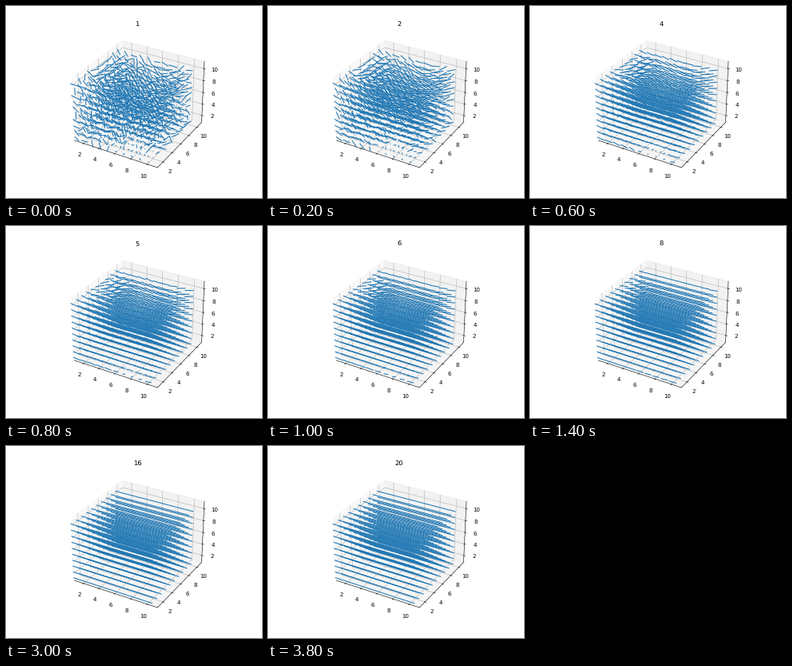
These frames come from a looping animation (320 by 240 pixels, 4 s). A matplotlib script:

```python
import numpy as np
import matplotlib.pyplot as plt
from matplotlib.animation import FuncAnimation

N = 10
FRAMES = 20
INTERVAL = 200
PAD = 10 / 48
LIMITS = (1 - PAD, 11 + PAD)

plt.rcParams["text.hinting"] = "none"

rng = np.random.default_rng(4)
x, y, z = np.meshgrid(*[np.arange(1, N + 1)] * 3, indexing="ij")
a, b, c = [(2 * q - N - 1) / (N - 1) for q in (x, y, z)]


def bump(px, py, pz, r):
    d2 = (a - px) ** 2 + (b - py) ** 2 + (c - pz) ** 2
    return np.exp(-d2 / r**2)


# Tilt of each director away from the x axis (tangents along y and z):
# a smooth part that relaxes slowly and local disorder that fades fast
low = bump(0.55, -1, -1, 0.45)
corner = bump(-0.75, 0.3, 1, 0.4)
top = bump(0, 0.7, 0.6, 0.5)
right = bump(1, 1, 0.8, 0.7)
smooth_y = 0.2 * np.sin(2 * a + b) - 5 * low + 9 * corner + 1.6 * right
smooth_z = -0.55 + 0.3 * (a - c) + 7 * low + 4 * corner - 2 * top + 2 * right
noise_y, noise_z = rng.normal(0, 0.85, (2, N, N, N))

fig = plt.figure(figsize=(6.4, 4.8), dpi=50)
ax = fig.add_subplot(projection="3d")
arrows = None


def draw(i):
    global arrows
    if arrows is not None:
        arrows.remove()
    slow, fast = 0.65**i, 0.4**i
    arrows = ax.quiver(x, y, z, np.ones(x.shape),
                       smooth_y * slow + noise_y * fast,
                       smooth_z * slow + noise_z * fast,
                       pivot="middle", normalize=True, arrow_length_ratio=0)
    ax.set(xlim=LIMITS, ylim=LIMITS, zlim=LIMITS)
    ax.set_title(str(i + 1))
    return [arrows]


anim = FuncAnimation(fig, draw, frames=FRAMES, interval=INTERVAL,
                     init_func=lambda: [], repeat=True, repeat_delay=0)
plt.show()
```
